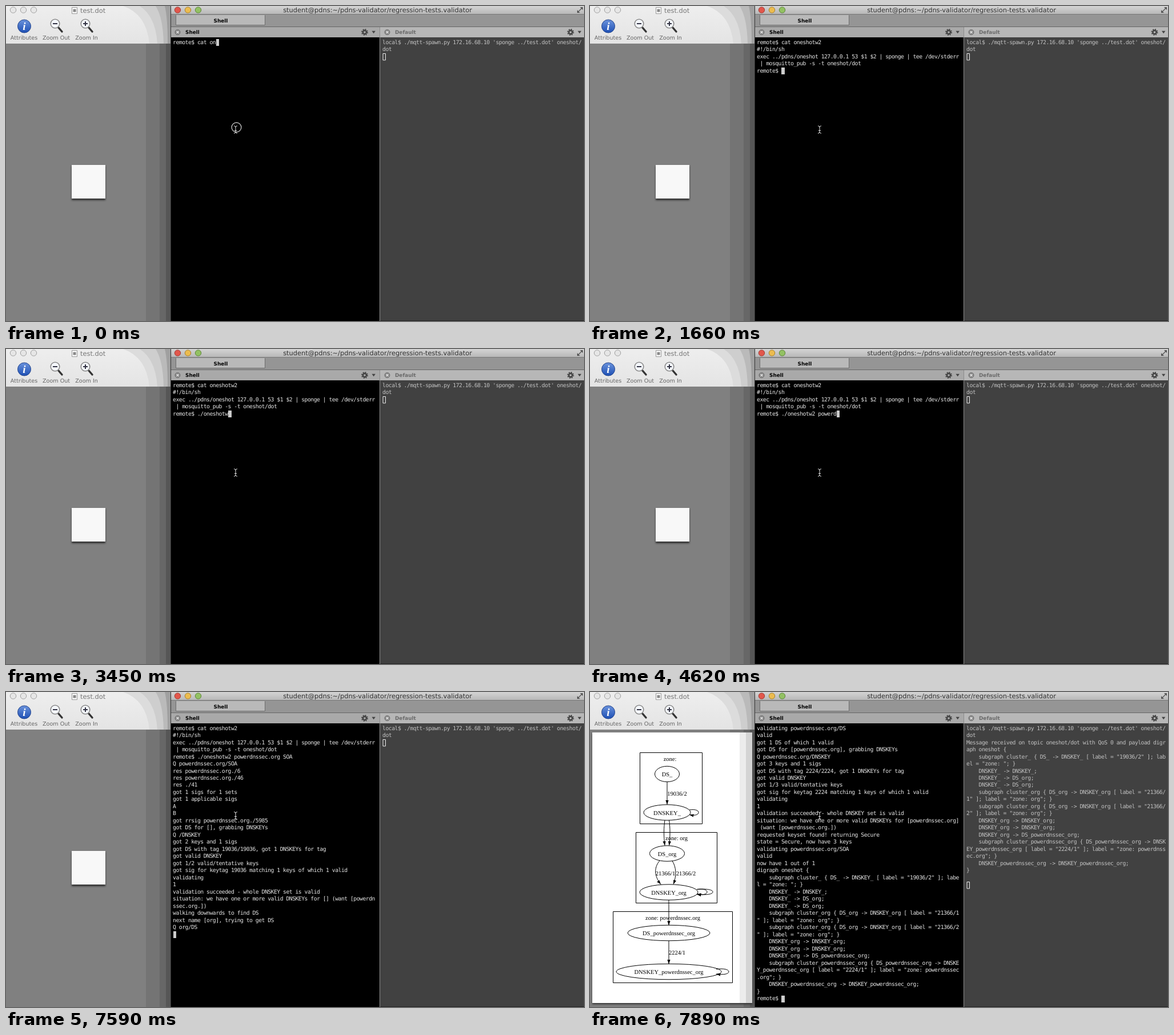
Animation of 1012 by 553 pixels, one loop 8000 ms. Source, as an HTML page:

```html
<!DOCTYPE html>
<html lang="en">
<head>
<meta charset="utf-8">
<title>Terminal and graph preview</title>
<style>
html, body { margin: 0; width: 100%; height: 100%; overflow: hidden; background: #808080; }
svg, pre, #cursor { position: absolute; }
svg { left: 0; top: 0; }
text { font-family: "DejaVu Sans", sans-serif; text-rendering: geometricPrecision; }
pre {
  margin: 0; top: 58.6px;
  font: 9.8px/12.49px "DejaVu Sans Mono", monospace;
  letter-spacing: calc(5.36px - 1ch);
  text-rendering: geometricPrecision;
}
#shell { left: 292.1px; color: #e6e6e6; }
#local { left: 659.1px; color: #c2c2c2; }
#cursor { width: 5.5px; height: 12px; background: #ccc; }
.tool { font-size: 9.6px; fill: #666; text-anchor: middle; }
.tab { font-size: 8.9px; font-weight: bold; }
#graph text { font: 10.5px "Liberation Serif", serif; text-anchor: middle; }
#graph .shape { fill: none; stroke: #000; }
</style>
</head>
<body>
<svg width="1012" height="553">
  <defs>
    <linearGradient id="bar" x2="0" y2="1"><stop stop-color="#eee"/><stop offset="1" stop-color="#e4e4e4"/></linearGradient>
    <linearGradient id="title" x2="0" y2="1"><stop stop-color="#d4d4d4"/><stop offset="1" stop-color="#b6b6b6"/></linearGradient>
    <linearGradient id="blue" x2="0" y2="1"><stop stop-color="#6b93dc"/><stop offset="1" stop-color="#1d4fb4"/></linearGradient>
    <filter id="soft" x="-20%" y="-20%" width="140%" height="150%"><feGaussianBlur stdDeviation="1.8"/></filter>
    <marker id="tip" markerWidth="8" markerHeight="6" refX="7.5" refY="2.6" orient="auto" markerUnits="userSpaceOnUse"><path d="M0 0L7.5 2.6L0 5.2z"/></marker>
    <g id="lens">
      <path d="M6 7L12 14" stroke="#333" stroke-width="3.4" stroke-linecap="round"/>
      <circle r="7.8" fill="#f4f7fb" stroke="#8a8a8a" stroke-width="1.6"/>
    </g>
    <g id="gear" fill="none" stroke="#444">
      <circle r="3.1" stroke-width="2.6"/>
      <circle r="5" stroke-width="1.9" stroke-dasharray="1.96"/>
      <path d="M12.5-2.2h6.4L15.7 2.2z" fill="#444" stroke="none"/>
    </g>
    <g id="close">
      <circle r="4.6" fill="#858585" stroke="#6c6c6c" stroke-width=".8"/>
      <path d="M-2-2L2 2M2-2L-2 2" stroke="#e4e4e4" stroke-width="1.3"/>
    </g>
  </defs>

  <!-- Preview window -->
  <path d="M0 66H288V553H0z" fill="#808080"/>
  <path d="M245 66H288V553H245z" fill="#747474"/>
  <path d="M269 66H288V553H269z" fill="#676767"/>
  <path d="M280 66H288V553H280z" fill="#565656"/>
  <path d="M0 0H288V66H0z" fill="url(#bar)"/>
  <path d="M205 0Q246 14 251 66H288V0z" fill="#dcdcdc"/>
  <path d="M234 0Q262 18 265 66H288V0z" fill="#cecece"/>
  <path d="M262 0Q275 20 276 66H288V0z" fill="#bababa"/>
  <path d="M278 0Q283 20 283 66H288V0z" fill="#a0a0a0"/>
  <g fill="#e6e6e6" stroke="#a0a0a0">
    <circle cx="12.5" cy="7" r="5.2"/><circle cx="30.5" cy="7" r="5.2"/><circle cx="48.5" cy="7" r="5.2"/>
  </g>
  <path d="M115.5 2.5H124.5V13.5H115.5z" fill="#f8f8f8" stroke="#999"/>
  <path d="M117.5 5.5H122.5V10.5H117.5z" fill="#888"/>
  <text x="130" y="11.5" font-size="11.4" fill="#777">test.dot</text>
  <circle cx="32" cy="35.5" r="11.5" fill="url(#blue)" stroke="#24458c"/>
  <text x="32" y="42" font-size="19" text-anchor="middle" fill="#fff" style="font-family:'Liberation Serif',serif;font-style:italic;font-weight:bold">i</text>
  <use href="#lens" x="86" y="31"/><path d="M82 31H90" stroke="#334" stroke-width="2"/>
  <use href="#lens" x="139" y="31"/><path d="M135 31H143M139 27V35" stroke="#334" stroke-width="2"/>
  <g class="tool"><text x="31.5" y="59">Attributes</text><text x="88" y="59">Zoom Out</text><text x="141" y="59">Zoom In</text></g>
  <g id="blank">
    <path d="M115 281H174V341H115z" fill="#333" filter="url(#soft)"/>
    <path d="M115 279H174V338H115z" fill="#f8f8f8"/>
  </g>
  <g id="graph" visibility="hidden">
    <path d="M4 73H284V548H4z" fill="#333" filter="url(#soft)"/>
    <path d="M4 71H284V546H4z" fill="#fff"/>
    <path d="M262 71H284V546H262z" fill="#ececec"/>
    <path d="M273 71H284V546H273z" fill="#d4d4d4"/>
  </g>

  <!-- Terminal window -->
  <path d="M288 0H1012V15H288z" fill="url(#title)"/>
  <path d="M288 15H1012V37H288z" fill="#959595"/>
  <path d="M288 14.5H1012" stroke="#777"/>
  <path d="M297.5 16V33.5H453.5V16" fill="#b9b9b9" stroke="#6c6c6c"/>
  <path d="M288 37H654V55H288z" fill="#a9a9a9"/>
  <path d="M654 37H1012V55H654z" fill="#b7b7b7"/>
  <path d="M288 36.5H1012M288 55.5H1012" stroke="#666"/>
  <path d="M288 55H654V553H288z"/>
  <path d="M655 55H1012V552H655z" fill="#414141"/>
  <path d="M655 552.5H1012" stroke="#222"/>
  <path d="M654.5 37V553" stroke="#8c8c8c"/>
  <path d="M288.5 0V553" stroke="#333"/>
  <g stroke-width=".9">
    <circle cx="300.5" cy="7" r="5.2" fill="#e2574c" stroke="#9c342c"/>
    <circle cx="318.5" cy="7" r="5.2" fill="#ecbc4f" stroke="#a27a25"/>
    <circle cx="336.5" cy="7" r="5.2" fill="#93c163" stroke="#557f30"/>
  </g>
  <text x="650.5" y="11.3" font-size="11.4" fill="#333" text-anchor="middle">student@pdns:~/pdns-validator/regression-tests.validator</text>
  <path d="M1005 2H1010V7zM1000 7V12H1005z" fill="#555"/>
  <path d="M1004 8L1008 4M1002 10L1006 6" stroke="#555" stroke-width="1.2"/>
  <g class="tab">
    <text x="376" y="29.3" text-anchor="middle">Shell</text>
    <text x="314" y="49.3">Shell</text>
    <text x="681" y="49.3" fill="#6a6a6a">Default</text>
  </g>
  <use href="#close" x="300.5" y="46"/><use href="#close" x="667.5" y="46"/>
  <use href="#gear" x="628" y="46"/><use href="#gear" x="988.5" y="46"/>
  <path id="localCursor" d="M660 83.5H664.5V95H660z" fill="none" stroke="#eee"/>
</svg>

<pre id="shell"></pre>
<pre id="local"></pre>
<div id="cursor"></div>
<svg width="1012" height="553" fill="none" stroke="#ddd">
  <path d="M399 210.5Q402 210.5 402 213V221Q402 223.5 399 223.5M405 210.5Q402 210.5 402 213M402 221Q402 223.5 405 223.5M400 218.5H404"/>
  <circle id="click" cx="403.5" cy="213" r="8.4" stroke-width="1.2"/>
</svg>

<script>
const LOOP = 8000, COL = 5.36, ROW = 12.49, ROWS = 39;
const $ = id => document.getElementById(id);

const digraph = `digraph oneshot {
    subgraph cluster_ { DS_ -> DNSKEY_ [ label = "19036/2" ]; label = "zone: "; }
    DNSKEY_ -> DNSKEY_;
    DNSKEY_ -> DS_org;
    DNSKEY_ -> DS_org;
    subgraph cluster_org { DS_org -> DNSKEY_org [ label = "21366/1" ]; label = "zone: org"; }
    subgraph cluster_org { DS_org -> DNSKEY_org [ label = "21366/2" ]; label = "zone: org"; }
    DNSKEY_org -> DNSKEY_org;
    DNSKEY_org -> DNSKEY_org;
    DNSKEY_org -> DS_powerdnssec_org;
    subgraph cluster_powerdnssec_org { DS_powerdnssec_org -> DNSKEY_powerdnssec_org [ label = "2224/1" ]; label = "zone: powerdnssec.org"; }
    DNSKEY_powerdnssec_org -> DNSKEY_powerdnssec_org;
}
`;

// Each entry appends its text to the shell at the given time.
const shellLog = [
  [0, "remote$ cat on"], [150, "es"], [320, "ho"], [620, "t"], [770, "w"], [1360, "2"],
  [1660, `
#!/bin/sh
exec ../pdns/oneshot 127.0.0.1 53 $1 $2 | sponge | tee /dev/stderr | mosquitto_pub -s -t oneshot/dot
remote$ `],
  [2710, "./"], [2860, "on"], [3010, "e"], [3150, "sh"], [3300, "o"], [3450, "tw"],
  [3740, "2"], [3890, " "],
  [4330, "po"], [4480, "we"], [4620, "rd"], [4770, "ns"], [4920, "s"], [5060, "ec"],
  [5360, ".o"], [5510, "rg"], [5650, " S"], [5800, "OA"],
  [7590, `
Q powerdnssec.org/SOA
res powerdnssec.org./6
res powerdnssec.org./46
res ./41
got 1 sigs for 1 sets
got 1 applicable sigs
A
B
got rrsig powerdnssec.org./5985
got DS for [], grabbing DNSKEYs
Q /DNSKEY
got 2 keys and 1 sigs
got DS with tag 19036/19036, got 1 DNSKEYs for tag
got valid DNSKEY
got 1/2 valid/tentative keys
got sig for keytag 19036 matching 1 keys of which 1 valid
validating
1
validation succeeded - whole DNSKEY set is valid
situation: we have one or more valid DNSKEYs for [] (want [powerdnssec.org.])
walking downwards to find DS
next name [org], trying to get DS
Q org/DS
`],
  [7740, `res org./43
res org./43
res org./46
res ./41
validating org/DS
valid
got 1 DS of which 1 valid
got DS for [org], grabbing DNSKEYs
Q org/DNSKEY
got 4 keys and 3 sigs
got DS with tag 21366/21366, got 1 DNSKEYs for tag
got valid DNSKEY
got DS with tag 21366/21366, got 1 DNSKEYs for tag
got valid DNSKEY
got 2/4 valid/tentative keys
got sig for keytag 9795 matching 1 keys of which 0 valid
got sig for keytag 21366 matching 1 keys of which 2 valid
validating
1
validation succeeded - whole DNSKEY set is valid
got sig for keytag 22449 matching 1 keys of which 1 valid
validating
1
validation succeeded - whole DNSKEY set is valid
situation: we have one or more valid DNSKEYs for [org] (want [powerdnssec.org.])
walking downwards to find DS
next name [powerdnssec.org], trying to get DS
Q powerdnssec.org/DS
res powerdnssec.org./43
res powerdnssec.org./46
res ./41
validating powerdnssec.org/DS
valid
got 1 DS of which 1 valid
got DS for [powerdnssec.org], grabbing DNSKEYs
Q powerdnssec.org/DNSKEY
`],
  [7890, `got 3 keys and 1 sigs
got DS with tag 2224/2224, got 1 DNSKEYs for tag
got valid DNSKEY
got 1/3 valid/tentative keys
got sig for keytag 2224 matching 1 keys of which 1 valid
validating
1
validation succeeded - whole DNSKEY set is valid
situation: we have one or more valid DNSKEYs for [powerdnssec.org] (want [powerdnssec.org.])
requested keyset found! returning Secure
state = Secure, now have 3 keys
validating powerdnssec.org/SOA
valid
now have 1 out of 1
${digraph}remote$ `]
];
const localLog = [
  [0, "local$ ./mqtt-spawn.py 172.16.68.10 'sponge ../test.dot' oneshot/dot\n"],
  [7890, `Message received on topic oneshot/dot with QoS 0 and payload ${digraph}\n`]
];

function rowsAt(log, t, width) {
  const text = log.filter(([start]) => start <= t).map(([, part]) => part).join("");
  return text.replace(new RegExp(`.{${width}}(?=.)`, "g"), "$&\n").split("\n").slice(-ROWS);
}

function buildGraph() {
  const box = (x, y, x2, y2) => `<path class="shape" d="M${x} ${y}H${x2}V${y2}H${x}z"/>`;
  const label = (x, y, s) => `<text x="${x}" y="${y}">${s}</text>`;
  const node = (x, y, rx, s) =>
    `<ellipse class="shape" cx="${x}" cy="${y}" rx="${rx}" ry="13.7"/>` + label(x, y + 4, s);
  const edge = d => `<path class="shape" marker-end="url(#tip)" d="${d}"/>`;
  const loop = (x, y, w) =>
    edge(`M${x} ${y - 4.5}C${x + w * .6} ${y - 6} ${x + w} ${y - 4} ${x + w} ${y}C${x + w} ${y + 4} ${x + w * .6} ${y + 6} ${x} ${y + 4}`);
  $("graph").innerHTML += [
    box(87.5, 106.5, 196.5, 231.5), label(140, 121, "zone:"),
    node(135, 144, 21.5, "DS_"), edge("M135 158V197.5"), label(152.5, 182, "19036/2"),
    node(135, 211.5, 41, "DNSKEY_"), loop(174, 211.5, 16),
    edge("M131 225C129 238 129 254 131 269.5"), edge("M138.5 225C140.5 238 140.5 254 138.5 269.5"),
    box(80.5, 246.5, 222.5, 370.5), label(151.5, 260, "zone: org"),
    node(135, 283.5, 30.5, "DS_org"),
    edge("M122 296C112 308 112 323 124 337.5"), edge("M144 296.5C151.5 308 151.5 323 146 337.5"),
    label(132, 322, "21366/1"), label(168, 322, "21366/2"),
    node(138, 351.5, 51, "DNSKEY_org"), loop(187, 351, 18), loop(187, 351, 28),
    edge("M138 365V409.5"),
    box(40.5, 385.5, 249.5, 510.5), label(145, 400, "zone: powerdnssec.org"),
    node(138, 423, 72, "DS_powerdnssec_org"), edge("M138 437V477.5"), label(152.5, 461, "2224/1"),
    node(138, 491, 92, "DNSKEY_powerdnssec_org"), loop(221, 491, 22)
  ].join("");
}

function draw() {
  const t = performance.now() % LOOP;
  const shell = rowsAt(shellLog, t, 66), local = rowsAt(localLog, t, 65);
  const received = t >= 7890;
  $("shell").textContent = shell.join("\n");
  $("local").textContent = local.join("\n");
  $("cursor").style.left = 292.6 + shell.at(-1).length * COL + "px";
  $("cursor").style.top = 58 + (shell.length - 1) * ROW + "px";
  $("localCursor").setAttribute("transform", `translate(0 ${Math.round((local.length - 3) * ROW)})`);
  $("click").setAttribute("visibility", t < 150 ? "visible" : "hidden");
  $("graph").setAttribute("visibility", received ? "visible" : "hidden");
  $("blank").setAttribute("visibility", received ? "hidden" : "visible");
  requestAnimationFrame(draw);
}

buildGraph();
draw();
</script>
</body>
</html>
```
